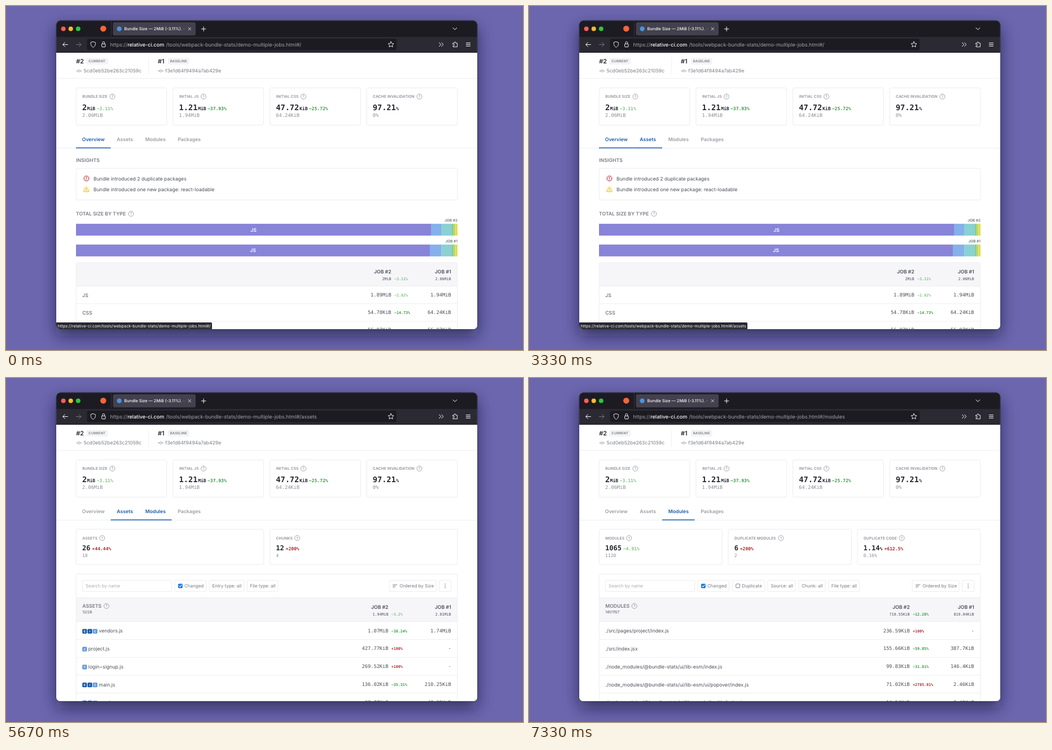
These frames come from a looping animation (916x611 px, 8 s). An HTML page:

```html
<!DOCTYPE html>
<html lang="en">
<head>
<meta charset="utf-8">
<title>Bundle stats demo</title>
<style>
html, body { margin: 0; width: 100%; height: 100%; overflow: hidden; background: #6b66ae; }
svg { display: block; width: 916px; height: 611px; text-rendering: geometricPrecision; }
text { font-family: Inter, sans-serif; white-space: pre; }
.mono { font-family: "DejaVu Sans Mono", monospace; }
</style>
</head>
<body>
<svg id="stage" viewBox="0 0 916 611"></svg>
<script>
const DARK = '#24262e', BODY = '#4b4e57', GRAY = '#8b8e97', LINE = '#e7e8ec', BLUE = '#1c5ba8';
const GREEN = '#2f9e3f', PALE = '#7cc57f', RED = '#b3262e';

const text = (x, y, s, size, fill = BODY, weight = 400, attrs = '') =>
  `<text x="${x}" y="${y}" font-size="${size}" font-weight="${weight}" fill="${fill}" ${attrs}>${s}</text>`;
const mono = (x, y, s, size, fill, weight = 400, attrs = '') =>
  text(x, y, s, size, fill, weight, 'class="mono" ' + attrs);
const END = 'text-anchor="end"', MID = 'text-anchor="middle"';
const rect = (x, y, w, h, fill, r = 0, attrs = '') =>
  `<rect x="${x}" y="${y}" width="${w}" height="${h}" rx="${r}" fill="${fill}" ${attrs}/>`;
const box = (x, y, w, h, r = 2.5) => rect(x, y, w, h, '#fff', r, `stroke="${LINE}" stroke-width=".8"`);
const circle = (x, y, r, fill, attrs = '') => `<circle cx="${x}" cy="${y}" r="${r}" fill="${fill}" ${attrs}/>`;
const path = (d, stroke, width = 1, attrs = '') =>
  `<path d="${d}" fill="none" stroke="${stroke}" stroke-width="${width}" stroke-linecap="round" stroke-linejoin="round" ${attrs}/>`;
const hline = (x, y, x2) => rect(x, y - .35, x2 - x, .7, LINE);
const group = (id, s) => `<g id="${id}">${s}</g>`;

const help = (x, y) => circle(x, y, 4.5, 'none', `stroke="${GRAY}" stroke-width=".8"`) +
  text(x, y + 2.3, '?', 6.4, GRAY, 500, MID);
const label = (x, y, s, helpX) => text(x, y, s, 6.67, GRAY, 600, 'letter-spacing=".1"') + help(helpX, y - 2.5);
const delta = (x, y, s, fill, size = 6.67) => mono(x, y, s.replace('-', '−'), size, fill, 700);

// [card x, width, label, help x, value, unit, unit x, delta, delta x, colour, previous]
function topCard([x, name, helpX, value, unit, unitX, change, changeX, fill, before]) {
  return box(x + .3, 145.5, 160.5, 66) + label(x + 11.3, 163.3, name, helpX) +
    mono(x + 11, 184.5, value, 13.6, DARK, 700) + mono(unitX, 184.5, unit, 8, DARK, 700) +
    delta(changeX, 184.5, change, fill, 8) + mono(x + 11, 197.3, before, 8.67, GRAY);
}
function card([x, w, name, helpX, value, unit, change, changeX, fill, before]) {
  return box(x + .3, 268.5, w, 63) + label(x + 11.3, 286.7, name, helpX) +
    mono(x + 11, 306, value + `<tspan font-size="8">${unit}</tspan>`, 12, DARK, 700) +
    delta(changeX, 306, change, fill, 8) + mono(x + 11, 318, before, 8, GRAY);
}

function chrome() {
  const ink = '#fbfbfe', dim = '#77767f';
  return rect(89, 26, 746, 57, '#1c1b22') + rect(89, 55, 746, 27, '#2b2a33') +
    ['#ff5f57', '#febc2e', '#28c840'].map((c, i) => circle(101.6 + i * 13.1, 40.5, 4, c)).join('') +
    circle(172.3, 40.3, 5.3, '#f5663a') +
    rect(186, 27, .8, 27, '#3a3944') +
    rect(189.5, 29, 146.5, 23.3, '#42414d', 3) +
    circle(200.6, 40.5, 4.2, '#4a92e0') +
    '<g clip-path="url(#title)">' + text(209.5, 43.3, 'Bundle Size — 2MiB (-3.11%). - Job', 7.33, ink, 500) + '</g>' +
    rect(308, 33, 12, 14, 'url(#fade)') +
    path('M323 38.3l4.6 4.6m0-4.6l-4.6 4.6', ink, .8) +
    path('M346.3 40.8h7.6m-3.8-3.8v7.6', ink) +
    path('M791.8 38.8l3.5 3.2 3.5-3.2', ink) +
    path('M109.3 68.5h-8.6m3.6-3.7l-3.7 3.7 3.7 3.7', ink) +
    path('M124.3 68.5h8.6m-3.6-3.7l3.7 3.7-3.7 3.7', dim) +
    rect(143.5, 58, 548.5, 20.5, '#1c1b22', 3) +
    path('M154.4 63.5l4.2 1.5c0 4-.6 6.4-4.2 8.4c-3.6-2-4.2-4.4-4.2-8.4z', ink, .9) +
    rect(169.6, 67.3, 6.4, 5.4, 'none', 1, `stroke="${ink}" stroke-width="1"`) +
    path('M170.9 67.2v-1.9a1.9 1.9 0 0 1 3.8 0v1.9', ink, .9) +
    text(184.5, 71.7, 'https://', 9, '#a3a2aa') +
    text(215.2, 71.7, 'relative-ci.com', 9.1, ink, 500) +
    text(283.4, 71.7, '/tools/webpack-bundle-stats/demo-multiple-jobs.html#/<tspan id="hash"></tspan>', 9, '#a3a2aa') +
    path('M682 63.2l1.5 3.3 3.5.4-2.6 2.4.7 3.5-3.1-1.8-3.1 1.8.7-3.5-2.6-2.4 3.5-.4z', ink, .9) +
    path('M767.4 65.2l3.3 3.2-3.3 3.2m4.2-6.4l3.3 3.2-3.3 3.2', ink) +
    path('M792 66h2.2v-1a1.3 1.3 0 0 1 2.6 0v1h2.7v6.6h-7.5v-2h1.2a1.3 1.3 0 0 0 0-2.6H792z', ink, .9) +
    path('M815.3 65.6h7.2m-7.2 2.8h7.2m-7.2 2.8h7.2', ink);
}

function header() {
  const job = (x, n, tag, w, hash) => text(x, 101.7, n, 10.8, DARK, 600) +
    rect(x + 18.5, 92.8, w, 10.5, '#f5f5f7', 2, 'stroke="#e6e7ea" stroke-width=".6"') +
    text(x + 18.5 + w / 2, 100.2, tag, 6, '#777a83', 600, MID + ' letter-spacing=".15"') +
    path(`M${x + .5} 115.3h2.6m4 0h2.6`, GRAY, .8) + circle(x + 5.1, 115.3, 1.9, 'none', `stroke="${GRAY}" stroke-width=".8"`) +
    text(x + 13.2, 118.3, hash, 8.67, '#7b7e87');
  return job(124.3, '#2', 'CURRENT', 37, '5cd0eb52be263c21059c') +
    rect(252.4, 92, .7, 31, LINE) +
    job(269, '#1', 'BASELINE', 36.5, 'f3e1d64f9494a7ab429e') +
    hline(89, 128.7, 835) + hline(89, 252.4, 835) +
    [
      [124, 'BUNDLE SIZE', 188.4, '2', 'MiB', 143.6, '-3.11%', 160.8, PALE, '2.06MiB'],
      [295.6, 'INITIAL JS', 350, '1.21', 'MiB', 340.2, '-37.93%', 357, GREEN, '1.94MiB'],
      [467.3, 'INITIAL CSS', 527, '47.72', 'KiB', 520, '-25.72%', 536.8, GREEN, '64.24KiB'],
      [638.8, 'CACHE INVALIDATION', 732.5, '97.21', '%', 691.2, '', 0, GRAY, '0%'],
    ].map(topCard).join('');
}

const tabs = [['Overview', 124, 61.5], ['Assets', 185.5, 50.5], ['Modules', 236, 57.5], ['Packages', 293.5, 62]];
const tabRow = () => tabs.map(([name, x, w], i) =>
  text(x + 10.8, 240.2, name, 8.67, '#9a9da5', 600, `id="tab${i}"`) +
  rect(x, 251.3, w, 1.5, BLUE, 0, `id="line${i}"`)).join('');

function tableHead(y, right, size2, change, fill, size1) {
  return text(right, y, 'JOB #2', 8.67, BODY, 600, END) + mono(right, y + 12, size2, 6.67, BODY, 400, END) +
    delta(right + 5.3, y + 12, change, fill) +
    text(788.6, y, 'JOB #1', 8.67, BODY, 600, END) + mono(788.6, y + 12, size1, 6.67, BODY, 400, END);
}
function row(y, right, [name, now, change, fill, before], x = 135.3) {
  return text(x, y + .7, name, 8.67) + mono(right, y, now, 8.67, BODY, 400, END) +
    delta(right + 5.3, y, change, fill) + mono(788.6, y, before, 8.67, BODY, 400, END);
}

function stack(y, name, edges) {
  const fills = ['#8884d8', '#85b0ea', '#8ad1d3', '#7fca94', '#a4d765', '#e2dc5a'];
  return fills.map((c, i) => rect(edges[i], y, edges[i + 1] - edges[i], 21, c)).join('') +
    text((edges[0] + edges[1]) / 2, y + 13.7, 'JS', 8.67, '#fff', 600, MID) +
    text(800, y - 4, name, 6.5, '#6d7079', 600, END);
}

function overview() {
  const right = 682.6;
  return text(124, 277.4, 'INSIGHTS', 8.67, '#777a83', 600, 'letter-spacing=".1"') +
    box(124.3, 288.3, 675.4, 56.2) +
    circle(142.5, 306.3, 6.8, '#fbeaec') + circle(142.5, 306.3, 4.3, 'none', `stroke="${RED}" stroke-width=".9"`) +
    path('M142.5 304v2.6m0 1.8v.1', RED, .9) +
    text(155, 309.5, 'Bundle introduced 2 duplicate packages', 8.67) +
    circle(142.5, 326.2, 6.8, '#fdf7dc') + path('M142.5 321.7l4.6 7.8h-9.2z', '#e3c128', .9) +
    path('M142.5 324.6v2m0 1.4v.1', '#e3c128', .9) +
    text(155, 329.4, 'Bundle introduced one new package: react-loadable', 8.67) +
    text(124, 371.8, 'TOTAL SIZE BY TYPE', 8.67, '#777a83', 600) + help(221.4, 369) +
    stack(386.8, 'JOB #2', [124, 753, 771, 789.3, 792.3, 795.3, 800]) +
    stack(423.7, 'JOB #1', [124, 751, 771.2, 789.3, 792.3, 795.3, 800]) +
    box(124.3, 455.8, 675.4, 140) + rect(124.7, 456.2, 674.6, 41.2, '#f6f6f9') +
    tableHead(474.5, right, '2MiB', '-3.11%', PALE, '2.06MiB') +
    [497.5, 528.8, 560].map(y => hline(124, y, 800)).join('') +
    row(516, right, ['JS', '1.89MiB', '-2.82%', PALE, '1.94MiB']) +
    row(547.3, right, ['CSS', '54.78KiB', '-14.73%', GREEN, '64.24KiB']) +
    row(578.3, right, ['IMG', '56.97KiB', '', GRAY, '56.97KiB']);
}

function filters(list) {
  const field = (x, w) => box(x, 359.2, w, 20.2, 2);
  return box(124.3, 348, 675.4, 260) + field(135.3, 158.3) + text(141, 372.3, 'Search by name', 8, '#a9acb4') +
    list.map(([x, w, name, check]) => field(x, w) + text(x + (check ? 17 : 5.2), 372.3, name, 8, '#777a83') +
      (check === 'on' ? rect(x + 6, 365.4, 7.8, 7.8, '#1673e6', 1.4) + path(`M${x + 7.8} 369.4l1.6 1.6 2.8-3.3`, '#fff', 1.1) : '') +
      (check === 'off' ? rect(x + 6.5, 365.8, 6.8, 6.8, '#fff', 1.2, 'stroke="#6f727a" stroke-width=".9"') : '')).join('') +
    field(679, 83.2) + path('M685.6 367h7.2m-7.2 2.4h5m-5 2.4h2.8', '#777a83', .9) +
    text(697.3, 372.3, 'Ordered by Size', 8, '#777a83') + field(767.6, 21) +
    [366, 369.2, 372.4].map(y => circle(778.1, y, .8, '#666972')).join('');
}
function listHead(name, helpX, count) {
  return rect(124.7, 390.3, 674.6, 42.3, '#f6f6f9') + hline(124, 390.3, 800) +
    text(135.2, 408, name, 8.67, '#777a83', 600) + help(helpX, 405) + text(135.2, 418.3, count, 6.67, BODY) +
    [432.6, 464.5, 496.2, 527.9, 559.7].map(y => hline(124, y, 800)).join('');
}
const rowY = i => 451.5 + i * 31.8;

function assets() {
  const right = 677.5;
  const badge = (s, x, y) => rect(x, y - 5.8, 8.2, 8.2, s === 'C' ? '#5f9ad8' : BLUE, 1.6) +
    text(x + 4.1, y + .3, s, 5.2, '#fff', 700, MID);
  const rows = [
    ['EIC', 'vendors.js', '1.07MiB', '-38.24%', GREEN, '1.74MiB'],
    ['C', 'project.js', '427.77KiB', '+100%', RED, '-'],
    ['C', 'login~signup.js', '269.52KiB', '+100%', RED, '-'],
    ['EIC', 'main.js', '136.02KiB', '-35.31%', GREEN, '210.25KiB'],
    ['EIC', 'vend.css', '37.77KiB', '-20.07%', GREEN, '47.25KiB'],
  ];
  return card([124, 332.4, 'ASSETS', 170.3, '26', '', '+44.44%', 152.6, RED, '18']) +
    card([467.3, 332.1, 'CHUNKS', 516, '12', '', '+200%', 495.6, RED, '4']) +
    filters([[299, 55.6, 'Changed', 'on'], [360.2, 61.4, 'Entry type: all'], [427, 55.2, 'File type: all']]) +
    listHead('ASSETS', 178, '12/26') + tableHead(409.6, right, '1.94MiB', '-3.2%', PALE, '2.01MiB') +
    rows.map(([tags, ...r], i) => [...tags].map((s, k) => badge(s, 135.2 + k * 9.3, rowY(i))).join('') +
      row(rowY(i), right, r, 136.4 + tags.length * 9.4)).join('');
}

function modules() {
  const right = 674.6, lib = './node_modules/@bundle-stats/ui/lib-esm/';
  const rows = [
    ['./src/pages/project/index.js', '236.59KiB', '+100%', RED, '-'],
    ['./src/index.jsx', '155.66KiB', '-59.85%', GREEN, '387.7KiB'],
    [lib + 'index.js', '99.83KiB', '-31.81%', GREEN, '146.4KiB'],
    [lib + 'ui/popover/index.js', '71.02KiB', '+2785.91%', RED, '2.46KiB'],
    [lib + 'ui/tooltip/index.js', '14.54KiB', '+499.5%', RED, '2.42KiB'],
  ];
  return card([124, 217.8, 'MODULES', 177.2, '1065', '', '-4.91%', 167, PALE, '1120']) +
    card([352.7, 218.3, 'DUPLICATE MODULES', 446.4, '6', '', '+200%', 373.8, RED, '2']) +
    card([581.6, 217.8, 'DUPLICATE CODE', 660.5, '1.14', '%', '+612.5%', 629.4, RED, '0.16%']) +
    filters([[299, 55.6, 'Changed', 'on'], [360.2, 57.6, 'Duplicate', 'off'], [423, 49.4, 'Source: all'],
      [477.8, 47.2, 'Chunk: all'], [530.5, 55.2, 'File type: all']]) +
    listHead('MODULES', 186.6, '141/1157') + tableHead(409.6, right, '710.55KiB', '-12.28%', GREEN, '810.04KiB') +
    rows.map((r, i) => row(rowY(i), right, r)).join('');
}

const statusBar = () => `<g id="status"><path id="statusBg" fill="#2b2a33"/>` +
  text(91.8, 570.9, 'https://relative-ci.com/tools/webpack-bundle-stats/demo-multiple-jobs.html#/<tspan id="statusHash"></tspan>', 7.3, '#fbfbfe') + '</g>';

document.getElementById('stage').innerHTML = `<defs>
  <clipPath id="window"><rect x="89" y="26" width="746" height="548" rx="6.5"/></clipPath>
  <clipPath id="title"><rect x="205" y="30" width="113" height="20"/></clipPath>
  <linearGradient id="fade"><stop stop-color="#42414d" stop-opacity="0"/><stop offset="1" stop-color="#42414d"/></linearGradient>
  <filter id="blur" x="-20%" y="-20%" width="140%" height="140%"><feGaussianBlur stdDeviation="14"/></filter>
  </defs>` + rect(0, 0, 916, 611, '#6b66ae') +
  rect(89, 38, 746, 548, '#0d0a2c', 8, 'filter="url(#blur)" opacity=".58"') +
  rect(88.6, 25.6, 746.8, 548.8, '#25232f', 7) +
  '<g clip-path="url(#window)">' + rect(89, 26, 746, 548, '#fff') + chrome() + header() + tabRow() +
  group('page0', overview()) + group('page1', assets()) + group('page2', modules()) +
  rect(828.6, 82.8, 4.8, 44, '#7d7d7f', 2.4, 'id="scroll"') + statusBar() + '</g>' +
  rect(89.3, 26.3, 745.4, 547.4, 'none', 6.3, 'stroke="#fff" stroke-opacity=".16" stroke-width=".6"');

const $ = id => document.getElementById(id);
const paths = ['', 'assets', 'modules'], statusEnds = [365, 387, 394];

// Each step: start time, page, hovered tab, status link, status opacity, scrollbar opacity
const steps = [
  [0, 0, 0, 0, 1, 0],
  [3000, 0, 1, 1, 1, 0],
  [3670, 1, 1, 1, 0, 1],
  [4000, 1, 1, 1, 0, .5],
  [4330, 1, 1, 1, 0, 0],
  [5670, 1, 2, 2, 0, 0],
  [6000, 2, 2, 2, .34, 1],
  [6330, 2, 2, 2, 0, 1],
  [6670, 2, 2, 2, 0, .5],
  [7000, 2, 2, 2, 0, 0],
];

function show([, page, hover, link, statusAlpha, scrollAlpha]) {
  tabs.forEach((_, i) => {
    const on = i === page || i === hover;
    $('tab' + i).setAttribute('fill', on ? BLUE : '#9a9da5');
    $('line' + i).style.display = on ? '' : 'none';
  });
  paths.forEach((_, i) => $('page' + i).style.display = i === page ? '' : 'none');
  $('hash').textContent = paths[page];
  $('statusHash').textContent = paths[link];
  $('statusBg').setAttribute('d', `M89 562H${statusEnds[link] - 2}q2 0 2 2V574H89z`);
  $('status').style.opacity = statusAlpha;
  $('scroll').style.opacity = scrollAlpha;
  $('scroll').setAttribute('height', page === 1 ? 295 : 44);
}

let current;
function tick() {
  const time = performance.now() % 8000;
  const step = steps.findLast(s => s[0] <= time);
  if (step !== current) show(current = step);
  requestAnimationFrame(tick);
}
tick();
</script>
</body>
</html>
```
